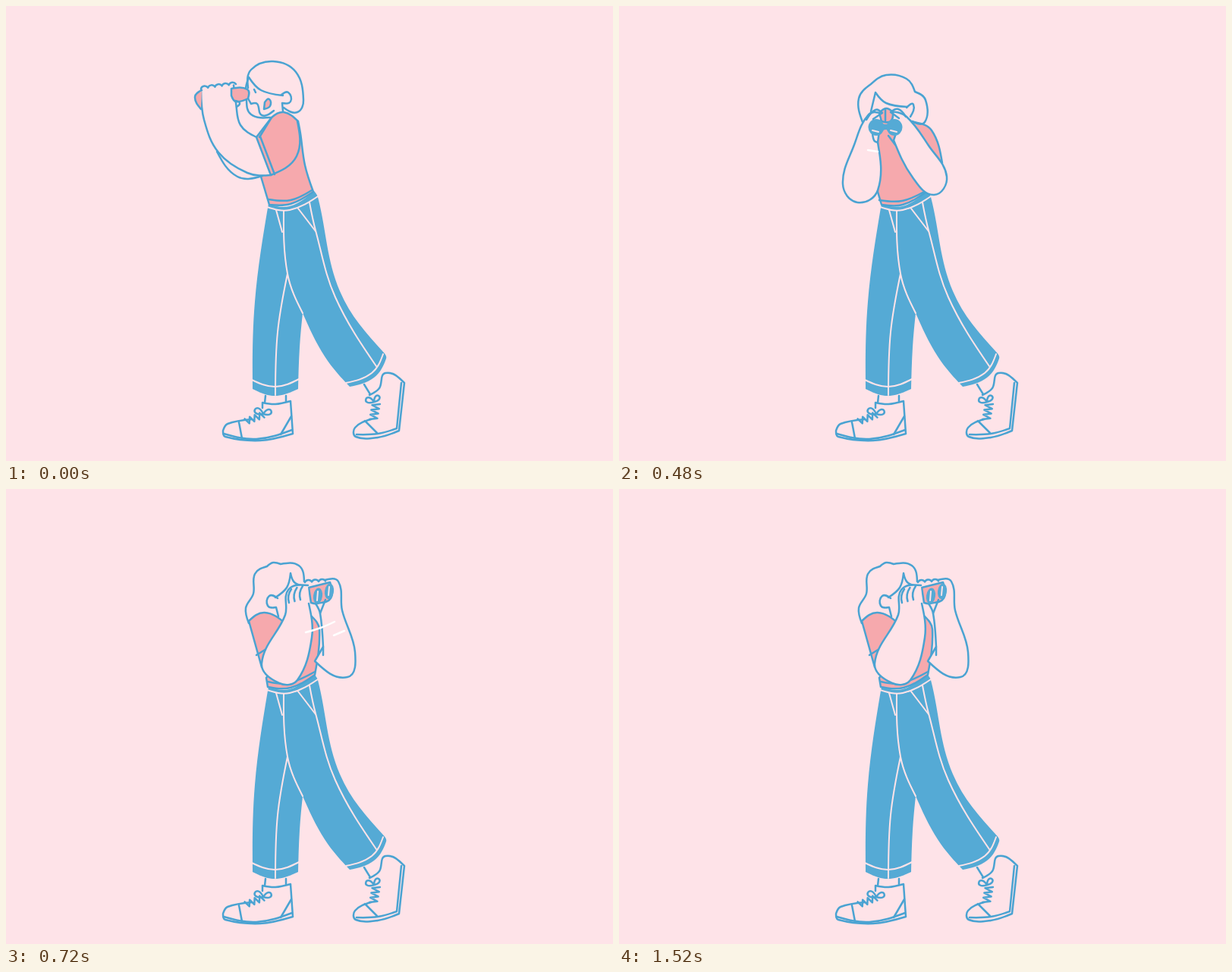
Write an HTML page that moves like this. It is 800 by 600 pixels and loops after 1.84 s.

```html
<!DOCTYPE html>
<html lang="en">
<head>
<meta charset="utf-8">
<title>Looking around</title>
<style>
  html, body { margin: 0; width: 100%; height: 100%; overflow: hidden; background: #fee3e8; }
  svg { display: block; width: 100vw; height: 100vh; }
  path { fill: none; stroke-linecap: round; stroke-linejoin: round; vector-effect: non-scaling-stroke; }
  .line, .skin, .rose { stroke: #4aa3d2; stroke-width: 2.5; }
  .skin { fill: #fee3e8; }
  .rose { fill: #f6a9ad; }
  .blue { fill: #55aad5; }
  .seam { stroke: #fee3e8; stroke-width: 2; }
  .trail { stroke: #fff; stroke-width: 2.5; }
</style>
</head>
<body>
<svg id="stage" viewBox="0 0 800 600"></svg>
<script>
const NS = "http://www.w3.org/2000/svg";
const stage = document.getElementById("stage");

// Point reached from p by going a share of the length b-c along the direction from-to.
function handle(p, from, to, b, c, sign) {
  const dx = to[0] - from[0], dy = to[1] - from[1];
  const k = sign * 0.36 * Math.hypot(c[0] - b[0], c[1] - b[1]) / (Math.hypot(dx, dy) || 1);
  return [p[0] + dx * k, p[1] + dy * k];
}
const mid = (p, q) => [(p[0] + q[0]) / 2, (p[1] + q[1]) / 2];

// Round curve through key points; "|" marks a corner, "z" closes.
function trace(text) {
  if (text[0] === "M") return text;
  let d = "", last = null;
  for (const part of text.replace("z", "").split("|")) {
    const pts = part.trim().split(/\s+/).map(p => p.split(",").map(Number));
    if (last) pts.unshift(last);
    else d = "M" + pts[0];
    for (let i = 0; i < pts.length - 1; i++) {
      const [b, c] = [pts[i], pts[i + 1]], a = pts[i - 1], e = pts[i + 2];
      let h1 = a && handle(b, a, c, b, c, 1);
      let h2 = e && handle(c, b, e, b, c, -1);
      h1 = h1 || mid(b, h2 || c);
      h2 = h2 || mid(c, h1);
      d += `C${h1} ${h2} ${c}`;
    }
    last = pts[pts.length - 1];
  }
  return d + (text.endsWith("z") ? "Z" : "");
}

const repeat = (n, fn) => Array.from({ length: n }, (_, i) => fn(i)).join("");

function oval(x, y, rx, ry, tilt = 0) {
  const a = tilt * Math.PI / 180, dx = rx * Math.cos(a), dy = rx * Math.sin(a);
  const half = `A${rx} ${ry} ${tilt} 0 1 `;
  return `M${x - dx} ${y - dy}${half}${x + dx} ${y + dy}${half}${x - dx} ${y - dy}`;
}

// Row of rounded fingertips
function knuckles(x, y, dx, dy, n) {
  const r = Math.hypot(dx, dy) * 0.56;
  return `M${x} ${y}` + repeat(n, () => `a${r} ${r} 0 0 1 ${dx} ${dy}`);
}

// Parallel finger lines
const fingers = (x, y, step, h, n) =>
  repeat(n, i => `M${x + step * i} ${y - 2 * i}q-6 ${h / 2} -3 ${h}`);

// Shoelace: zigzag from one end to the other
function lace(x0, y0, x1, y1, width, n) {
  const dx = x1 - x0, dy = y1 - y0, k = width / Math.hypot(dx, dy);
  return "M" + repeat(n + 1, i => {
    const side = i % 2 ? k : -k;
    return `${i ? "L" : ""}${x0 + dx * i / n - dy * side} ${y0 + dy * i / n + dx * side}`;
  });
}

// Loop of a bow pointing along an angle
function bow(x, y, angle, size) {
  const tip = turn => {
    const a = (angle + turn) * Math.PI / 180;
    return `${x + size * Math.cos(a)} ${y + size * Math.sin(a)}`;
  };
  return `M${x} ${y}C${tip(-38)} ${tip(38)} ${x} ${y}`;
}

function draw(parts) {
  const g = document.createElementNS(NS, "g");
  for (const [style, shape] of parts) {
    const p = document.createElementNS(NS, "path");
    p.setAttribute("class", style);
    p.setAttribute("d", trace(shape));
    g.append(p);
  }
  stage.append(g);
  return g;
}

// Trousers
draw([
  ["blue", "346,261 374,264 406,244|411,252 440,376 497,456|501,465 485,490 453,502|420,462 391,405|387,450 385,505|354,514 325,505|328,390 345,266z"],
  ["seam", "344,265 374,269 411,251"],
  ["seam", "366,270 371,353 391,405"],
  ["seam", "371,353 358,430 355,513"],
  ["seam", "356,269 364,298"],
  ["seam", "385,267 408,297"],
  ["seam", "400,259 408,296 434,384 488,475"],
  ["seam", "324,493 355,502 386,492"],
  ["seam", "448,497 482,484 497,459"],
]);

// Shoes
draw([
  ["line", "342,514 341,523"],
  ["line", "369,514 369,521"],
  ["line", "338,530 338,523|355,525 375,521|378,564|335,573 289,568 286,560|292,551 324,545"],
  ["line", "287,564 330,571 377,559"],
  ["line", "307,549 311,570"],
  ["line", "376,541 362,565"],
  ["line", lace(316, 548, 339, 539, 4, 7)],
  ["line", bow(339, 538, 208, 21)],
  ["line", bow(339, 538, -20, 19)],
  ["line", "472,499 480,512"],
  ["line", "479,513 492,504 500,484 525,497|518,560|490,569 461,568 460,556 481,545"],
  ["line", "521,497 515,557|490,564 462,565"],
  ["line", "473,547 489,563"],
  ["line", lace(484, 546, 488, 524, 5, 7)],
  ["line", bow(485, 522, 198, 19)],
  ["line", bow(485, 522, -50, 17)],
]);

const left = draw([
  ["rose", "350,147 366,140 385,152|388,168 394,210 405,245|375,261 347,262|336,225|330,173z"],
  ["line", "346,255 375,256 403,243"],
  ["line", "349,223 383,198 384,152"],
  ["line", "335,172 354,222"],
  ["line", "350,147 334,173"],
  ["line", "317,124 323,143 348,147"],
  ["line", "278,192 305,225 338,224"],
  ["skin", "300,104|303,128 309,157 330,173|349,223|318,220 280,193 261,150 257,110"],
  ["line", "319,108 323,84 352,73 382,87 392,124 384,140 366,134"],
  ["line", "320,94 336,111 365,118"],
  ["line", "363,117 372,114 375,126 364,128|365,139"],
  ["line", "320,94 316,112 323,129|331,129 337,144 353,138"],
  ["rose", "341,127|347,123 348,132 340,136z"],
  ["line", "327,110 329,114"],
  ["rose", "258,111 249,120 257,136"],
  ["rose", "297,109|318,110 319,122|303,126 297,118z"],
  ["skin", knuckles(257, 109, 9.2, -1.2, 5)],
  ["line", "302,125 308,128 304,133"],
]);

const lens = x => [
  ["blue", oval(x, 160, 10.5, 11)],
  ["seam", `${x - 5},164 ${x + 3},166`],
];

const front = draw([
  ["rose", "345,150|389,153 412,164 426,207|405,245|374,262 346,262|341,245|341,180z"],
  ["line", "343,256 373,257 404,244"],
  ["line", "355,171 364,183"],
  ["line", "386,152 403,153 404,124 390,113|379,96 352,91 332,103|316,122 321,153"],
  ["line", "332,139 338,114|352,128 380,133"],
  ["line", "379,134 388,130 384,146"],
  ["skin", "347,142 329,143 310,183 295,235 314,259 341,243 341,180|336,177 334,165"],
  ["skin", "358,139 379,146 408,184 432,225 415,249 387,226 362,177|365,168"],
  ["rose", "343,141 352,135 361,140|358,152 346,152z"],
  ["line", "351,136 351,151"],
  ["blue", "340,152 352,156 364,152|364,168 352,163 340,168z"],
  ...lens(339), ...lens(363),
  ["line", "326,150 338,137 347,141|335,149"],
  ["line", "378,146 368,136 358,140|369,148"],
  ["trail", "328,190 341,192"],
]);

const turn = draw([
  ["rose", "338,162 324,174 314,231|346,262|374,262 409,244|404,190|390,162z"],
  ["line", "314,231 322,218"],
  ["line", "345,258 373,257 408,243"],
  ["skin", "377,185 390,176 393,162"],
  ["line", "376,181 387,162"],
  ["line", "322,176 316,162 327,140 328,115 345,104|368,97 396,118"],
  ["line", "360,128 366,112|379,125"],
  ["skin", "395,122 421,126 431,165 453,220 440,249 410,246|409,207 403,185|407,163 403,148"],
  ["rose", "372,128 402,125|396,149 381,151z"],
  ["blue", "373,134 405,130|403,146 378,152z"],
  ["blue", oval(386, 144, 8.5, 10.5, 15)],
  ["blue", oval(404, 139, 7.5, 10, 15)],
  ["seam", "387,149 389,138"],
  ["seam", "405,144 406,134"],
  ["skin", knuckles(377, 126, 8, -1, 4)],
  ["skin", "370,123 342,148 337,183 318,238 341,262 370,230 377,185 379,150 371,130"],
  ["line", fingers(357, 136, 6, 14, 3)],
  ["trail", "366,193 388,192 410,185"],
  ["trail", "415,197 432,193"],
]);

const right = draw([
  ["rose", "403,168 413,185 407,245|375,262 345,261|343,249z"],
  ["line", "345,254 372,256 407,241"],
  ["line", "320,177 316,157 326,138 328,112 344,102|352,97 362,99|386,101 393,122"],
  ["line", "355,143 370,130 375,111|380,123 392,128"],
  ["line", "358,144 347,141 345,154 356,156|359,168"],
  ["rose", "320,174 341,163 368,177|337,235z"],
  ["line", "330,219 351,206"],
  ["skin", "420,120 438,122 443,160 460,215 450,248 407,227|418,208|414,164 408,151"],
  ["line", "418,208 418,219"],
  ["rose", "399,130 427,123|428,144 410,151 402,150z"],
  ["blue", oval(411, 141, 6, 10.5, 8)],
  ["blue", oval(426, 135, 6, 10.5, 8)],
  ["seam", "410,147 411,135"],
  ["seam", "425,140 426,129"],
  ["skin", knuckles(394, 123, 9, -0.5, 3)],
  ["line", "421,146 414,164"],
  ["skin", "398,127 372,133 368,166 337,230 360,256 384,252 403,196 399,151"],
  ["line", fingers(376, 132, 7.5, 18, 3)],
]);

const trails = draw([
  ["trail", "395,189 415,183 433,175"],
  ["trail", "432,193 446,187"],
]);

// Both in-between moves keep the waist in place.
const squash = "translate(375 255) scale(.86 .93) translate(-375 -255)";
const lean = "translate(0 255) skewX(-5) translate(0 -255)";
const poses = [left, front, turn, right];
const LOOP = 1840, STEP = 80, TURN = 400;
const moves = [[left, squash], [front], [front, lean], [turn], [right]];

function render(t) {
  const step = Math.floor((t - TURN) / STEP);
  const [pose, move = ""] = step < 0 ? [left] : moves[Math.min(step, moves.length - 1)];
  for (const g of poses) g.style.display = g === pose ? "" : "none";
  pose.setAttribute("transform", move);
  const age = step - moves.length + 1;
  trails.style.opacity = age < 0 ? 0 : Math.max(0, 1 - age / 3);
}

function tick() {
  render(performance.now() % LOOP);
  requestAnimationFrame(tick);
}
tick();
</script>
</body>
</html>
```
